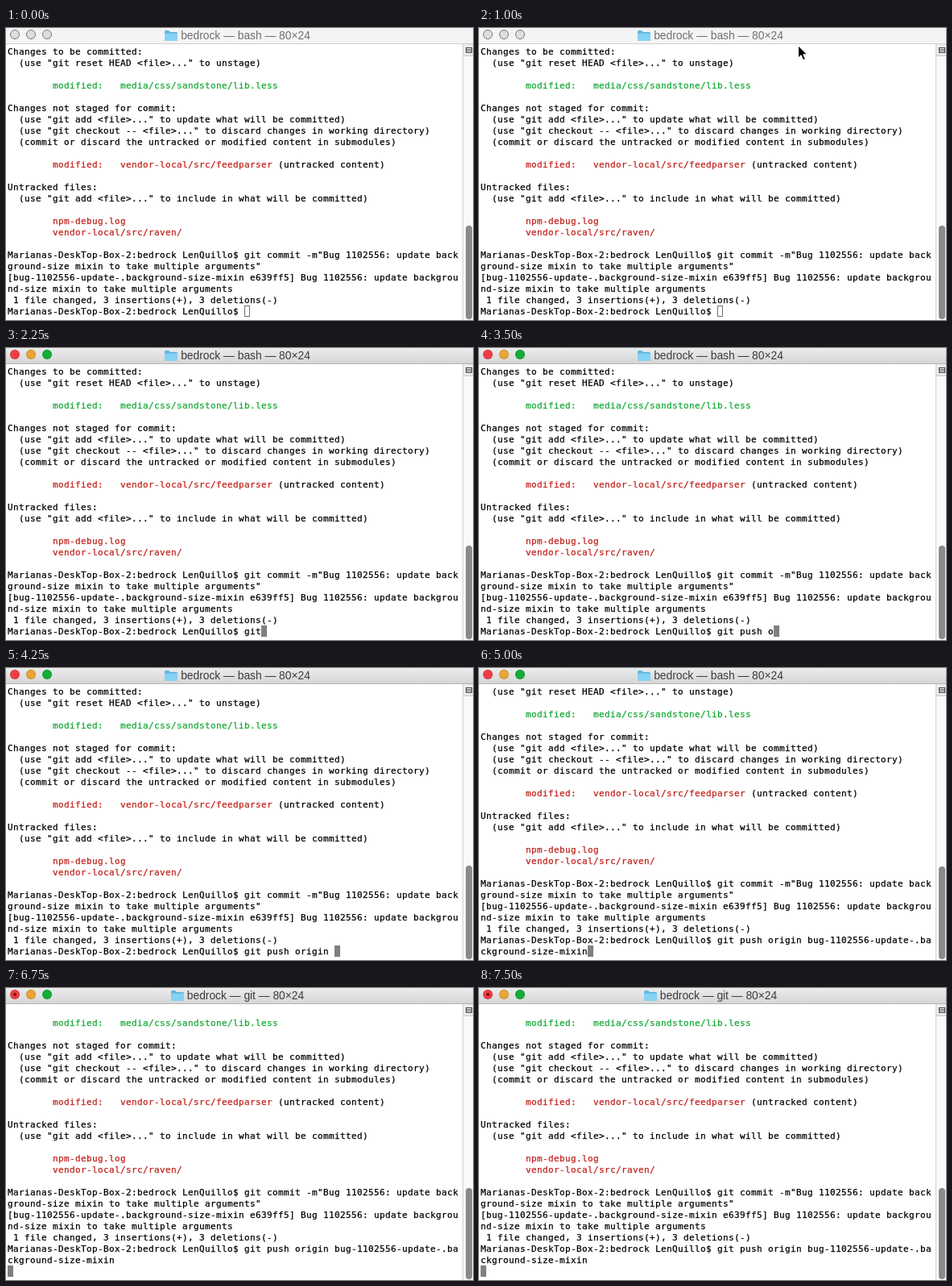
Animation, 580 px wide and 362 px high, one loop 8000 ms. Source, as an HTML page:

```html
<!DOCTYPE html>
<html lang="en">
<head>
<meta charset="utf-8">
<title>Terminal</title>
<style>
  html, body { margin: 0; width: 100%; height: 100%; overflow: hidden; background: #fff; }
  #stage { position: relative; width: 580px; height: 362px; overflow: hidden; background: #fff; }
  #stage div, #stage svg { position: absolute; box-sizing: border-box; }

  #bar { width: 580px; height: 20px; background: linear-gradient(#ececec, #d6d6d6); border-bottom: 1px solid #b4b4b4; }
  .idle #bar { background: #f4f4f4; border-color: #d0d0d0; }
  #title { top: 1px; width: 575px; height: 17px; display: flex; justify-content: center; gap: 4px; white-space: pre;
    font: 13.8px/17px "Liberation Sans", Arial, sans-serif; color: #3c3c3c; }
  #stage #title svg { position: static; flex: none; margin-top: 1px; }
  .idle #title { color: #707070; }
  .light { top: 2px; width: 12px; height: 12px; border-radius: 50%; border: 1px solid #0002; }
  .idle .light { background: #dedede !important; border-color: #777; }
  #dirty { left: 9px; top: 6px; width: 4px; height: 4px; border-radius: 50%; background: #7d0b08; }

  #screen { top: 23px; width: 567px; height: 336px; overflow: hidden; }
  pre { position: absolute; left: 2px; margin: 0; color: #000;
    font: 11px/14px "DejaVu Sans Mono", Menlo, monospace; font-variant-ligatures: none; -webkit-text-stroke: 0.25px; }
  pre b { font-weight: normal; color: #12a834; }
  pre i { font-style: normal; color: #c0221c; }
  #caret { top: 321px; width: 7px; height: 14px; background: #7f7f7f; }
  .idle #caret { background: none; border: 1px solid #707070; }

  #track { left: 567px; top: 20px; width: 13px; height: 342px; border-left: 1px solid #d0d0d0;
    background: linear-gradient(#ececec 14px, #c4c4c4 14px 15px, #fafafa 15px); }
  #split { left: 571px; top: 24px; width: 8px; height: 7px; border: 1px solid #444;
    background: repeating-linear-gradient(#fff 0 1px, #555 1px 2px); }
  #thumb { left: 571px; width: 8px; border-radius: 4px; background: #8a8a8a; }
</style>
</head>
<body>
<div id="stage">
  <div id="screen"><div id="caret"></div><pre id="text"></pre></div>
  <div id="track"></div><div id="split"></div><div id="thumb"></div>
  <div id="bar"></div>
  <div class="light" style="left:5px;background:#f13d45"></div>
  <div class="light" style="left:25px;background:#e9a437"></div>
  <div class="light" style="left:45px;background:#12ad38"></div>
  <div id="dirty"></div>
  <div id="title">
    <svg width="16" height="15"><path d="M0 2.5Q0 1 1.5 1H5l2 2h7.5q1.5 0 1.5 1.5V13q0 1-1 1H1q-1 0-1-1z" fill="#5fb9e2"/><path d="M0 5h16v8q0 1-1 1H1q-1 0-1-1z" fill="#86d2f3"/></svg><span id="name"></span>
  </div>
  <svg id="arrow" width="14" height="21"><path d="M1.5 1v15l3.5-3.3 2.6 6 2.7-1.2-2.6-5.7h4.8z" fill="#000" stroke="#fff"/></svg>
</div>
<script>
const $ = id => document.getElementById(id);
const prompt = 'Marianas-DeskTop-Box-2:bedrock LenQuillo$ ';
const history = `Changes to be committed:
  (use "git reset HEAD &lt;file>..." to unstage)

        <b>modified:   media/css/sandstone/lib.less</b>

Changes not staged for commit:
  (use "git add &lt;file>..." to update what will be committed)
  (use "git checkout -- &lt;file>..." to discard changes in working directory)
  (commit or discard the untracked or modified content in submodules)

        <i>modified:   vendor-local/src/feedparser</i> (untracked content)

Untracked files:
  (use "git add &lt;file>..." to include in what will be committed)

        <i>npm-debug.log</i>
        <i>vendor-local/src/raven/</i>

${prompt}git commit -m"Bug 1102556: update back
ground-size mixin to take multiple arguments"
[bug-1102556-update-.background-size-mixin e639ff5] Bug 1102556: update backgrou
nd-size mixin to take multiple arguments
 1 file changed, 3 insertions(+), 3 deletions(-)
${prompt}`;
const command = 'git push origin bug-1102556-update-.background-size-mixin';

// Each step: [start ms, value]
const typed = [[0, 0], [2250, 3], [2500, 5], [2750, 8], [3500, 10], [3750, 12], [4000, 15], [4250, 16], [5000, command.length]];
const pointer = [[0, null], [250, [487, 284]], [500, [428, 194]], [750, [402, 89]], [1000, [395, 21]], [1500, null]];
const process = [[0, 'bash'], [6250, 'git-remote-https'], [6750, 'git'], [7000, 'git-remote-https'], [7500, 'git']];
const scroll = [[0, 0], [5000, 1], [6000, 2]];
const at = (steps, t) => steps.filter(s => s[0] <= t).pop()[1];

// Fit the font to the 7px character grid
const text = $('text');
text.textContent = '0'.repeat(80);
text.style.letterSpacing = 7 - text.getBoundingClientRect().width / 80 + 'px';

let shown;
function draw(now) {
  const t = Math.floor(now % 8000 / 250) * 250;
  if (t !== shown) {
    shown = t;
    const n = at(typed, t), up = at(scroll, t), pos = at(pointer, t);
    const room = 80 - prompt.length;
    const input = command.slice(0, n);
    const col = up === 2 ? 0 : up ? n - room : prompt.length + n;

    $('stage').className = t < 1250 ? 'idle' : '';
    text.innerHTML = history + input.slice(0, room) + (n > room ? '\n' + input.slice(room) : '');
    text.style.top = -14 * up + 'px';
    $('caret').style.left = 2 + 7 * col + 'px';
    $('name').textContent = `bedrock — ${at(process, t)} — 80×24`;
    $('dirty').hidden = t < 6250;
    const top = [245, 246, 248][up];
    $('thumb').style.top = top + 'px';
    $('thumb').style.height = 361 - top + 'px';
    $('arrow').style.display = pos ? '' : 'none';
    if (pos) {
      $('arrow').style.left = pos[0] + 'px';
      $('arrow').style.top = pos[1] + 'px';
    }
  }
  requestAnimationFrame(() => draw(performance.now()));
}
draw(performance.now());
</script>
</body>
</html>
```
